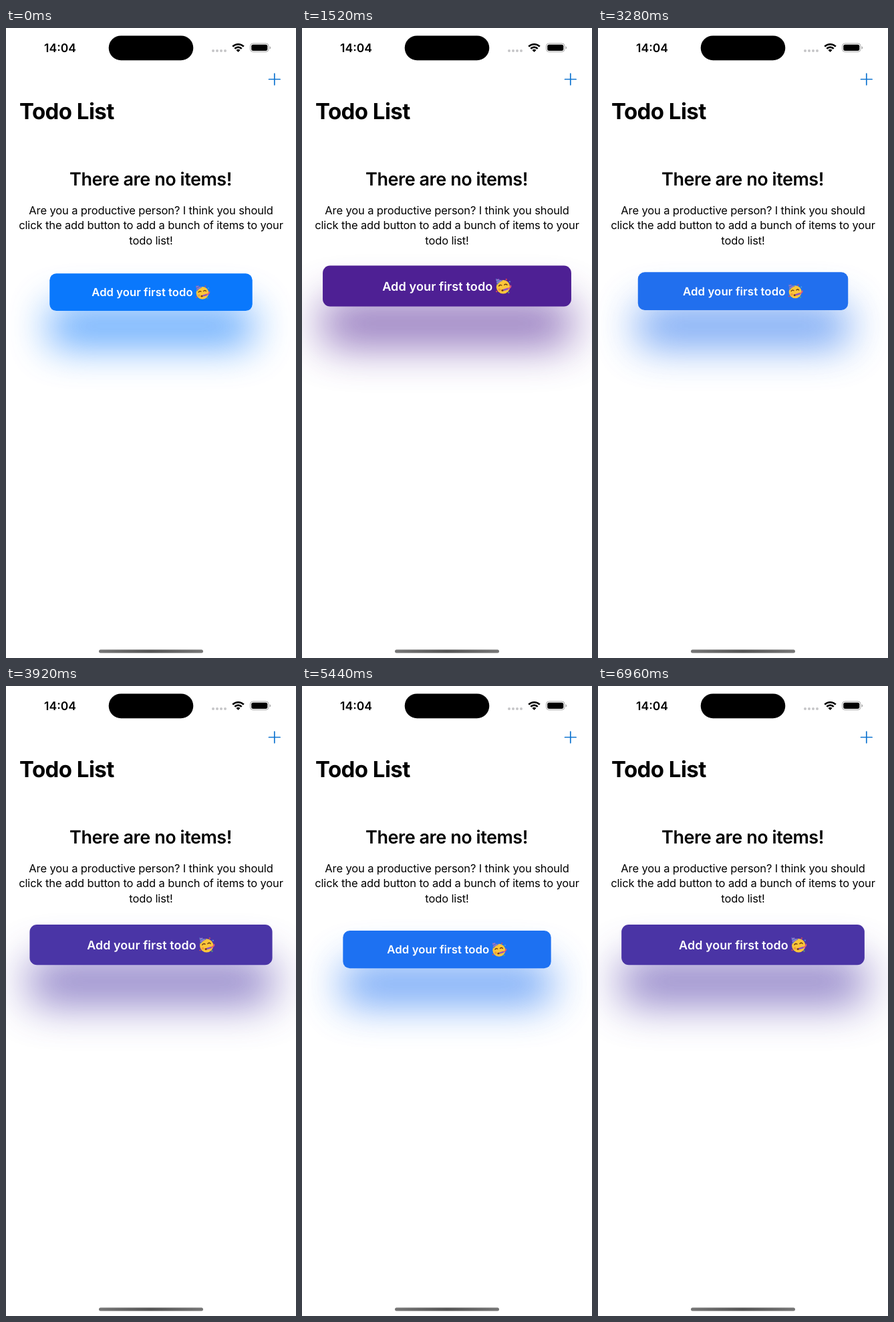
These frames come from a looping animation (434 px wide and 940 px high, 7.04 s). An HTML page:

```html
<!DOCTYPE html>
<html lang="en">
<head>
<meta charset="utf-8">
<title>Todo List</title>
<style>
  html, body { margin: 0; width: 100%; height: 100%; overflow: hidden; background: #fff; }
  svg { display: block; width: 434px; height: 940px; }
  text {
    font: 16.5px Inter, "Liberation Sans", sans-serif;
    font-optical-sizing: none;
    text-rendering: geometricPrecision;
  }
  .mid { text-anchor: middle; }
  .clock { font-size: 17.5px; font-weight: 600; }
  .title { font-size: 33px; font-weight: 700; letter-spacing: -.55px; }
  .heading { font-size: 27px; font-weight: 600; letter-spacing: -.45px; }
  .body { letter-spacing: -.12px; }
  .label { font-weight: 600; letter-spacing: .08px; fill: #fff; }
  #shadow { opacity: .7; filter: blur(30.3px); }
</style>
</head>
<body>
<svg viewBox="0 0 434 940">
  <linearGradient id="bar">
    <stop stop-color="#777"/><stop offset=".5" stop-color="#555"/><stop offset="1" stop-color="#777"/>
  </linearGradient>

  <!-- status bar -->
  <text class="clock mid" x="81" y="36">14:04</text>
  <rect x="153.7" y="11.4" width="126.6" height="36.8" rx="18.4"/>
  <g fill="#c6c6c8">
    <circle cx="310" cy="34" r="2"/><circle cx="316" cy="34" r="2"/>
    <circle cx="322" cy="34" r="2"/><circle cx="328" cy="34" r="2"/>
  </g>
  <g transform="translate(347.5 36)">
    <path d="M-8.3-8.3A11.7 11.7 0 0 1 8.3-8.3M-5.2-5.2A7.4 7.4 0 0 1 5.2-5.2" fill="none" stroke="#000" stroke-width="2.6"/>
    <path d="M0 0L-3-3A4.2 4.2 0 0 1 3-3Z"/>
  </g>
  <rect x="365.5" y="23" width="27.5" height="12.6" rx="4" fill="none" stroke="#a5a5a5"/>
  <rect x="367.2" y="24.7" width="24.1" height="9.2" rx="2.6"/>
  <path d="M394.6 27.2a2.3 2.3 0 0 1 0 4.4z" fill="#a5a5a5"/>

  <path d="M393.5 76.5h16.6M401.8 68.2v16.6" stroke="#0f74d0" stroke-width="1.7" stroke-linecap="round"/>
  <text class="title" x="20" y="135.5">Todo List</text>
  <text class="heading mid" x="216.5" y="234.5">There are no items!</text>
  <text class="body mid" x="217" y="278.3">Are you a productive person? I think you should</text>
  <text class="body mid" x="217" y="300.4">click the add button to add a bunch of items to your</text>
  <text class="body mid" x="217" y="322.5">todo list!</text>

  <g id="button">
    <rect id="shadow" y="22.75" height="55.5" rx="10"/>
    <rect id="face" y="-27.75" height="55.5" rx="10"/>
    <text class="label" x="-88.4" y="6">Add your first todo</text>
    <!-- partying face -->
    <g transform="translate(77 0) scale(1.1)">
      <circle cx="-.3" cy="1" r="8.5" fill="#fcc63a"/>
      <path d="M-9.4-9.2L-7.6-1.2Q-5.5-5.3-.4-6.6Z" fill="#4a7fc4"/>
      <path d="M-8.9-7L-5.4-8.4M-8.2-3.8L-2.6-7" stroke="#a86bd0" stroke-width="1.3"/>
      <path d="M-5.6 0q1.6-2.2 3.4-.8M1.2-1.4q1.8-1.9 3.4 0" fill="none" stroke="#6b3d12" stroke-width="1.2" stroke-linecap="round"/>
      <path d="M-.4 5.2L6 3.2" stroke="#8d55c4" stroke-width="2.2"/>
      <path d="M6 3.2q3.8-1.6 3-3.6" fill="none" stroke="#e0567a" stroke-width="1.6" stroke-linecap="round"/>
      <circle cx="-1.2" cy="5.4" r="1.3" fill="#7a3b16"/>
      <circle cx="-4.8" cy="4.4" r="1.6" fill="#f39a3c"/>
      <circle cx="3.6" cy="-8.2" r=".9" fill="#e5484d"/>
      <circle cx="7.8" cy="-5.4" r=".9" fill="#4aa3df"/>
      <circle cx="-8.4" cy="6.8" r=".9" fill="#e5484d"/>
      <circle cx="6.6" cy="8" r=".9" fill="#58b368"/>
    </g>
  </g>

  <rect x="139" y="927.5" width="156" height="5" rx="2.5" fill="url(#bar)"/>
</svg>
<script>
const LOOP = 7040, STEP = 80, HALF = 1515, START = 0.14;
const [button, shadow, face] = ['button', 'shadow', 'face'].map(id => document.getElementById(id));

// cubic-bezier(.42, 0, .58, 1), solved by bisection
function easeInOut(x) {
  let lo = 0, hi = 1;
  for (let i = 0; i < 24; i++) {
    const s = (lo + hi) / 2, r = 1 - s;
    if (1.26 * s * r * r + 1.74 * s * s * r + s ** 3 < x) lo = s; else hi = s;
  }
  return lo * lo * (3 - 2 * lo);
}

function draw(now) {
  const t = Math.floor(now % LOOP / STEP) * STEP;
  const phase = (START + t / HALF) % 2;
  const p = easeInOut(phase > 1 ? 2 - phase : phase);
  const width = 1.009 * (298 + 40 * p);
  const color = `color-mix(in srgb-linear, #007aff, #50148d ${p * 100}%)`;
  button.setAttribute('transform', `translate(217 ${394.6 - 10 * p}) scale(${1 + 0.1 * p})`);
  for (const box of [shadow, face]) {
    box.setAttribute('x', -width / 2);
    box.setAttribute('width', width);
    box.style.fill = color;
  }
}

const begin = performance.now();
function tick() {
  draw(performance.now() - begin);
  requestAnimationFrame(tick);
}
tick();
</script>
</body>
</html>
```
